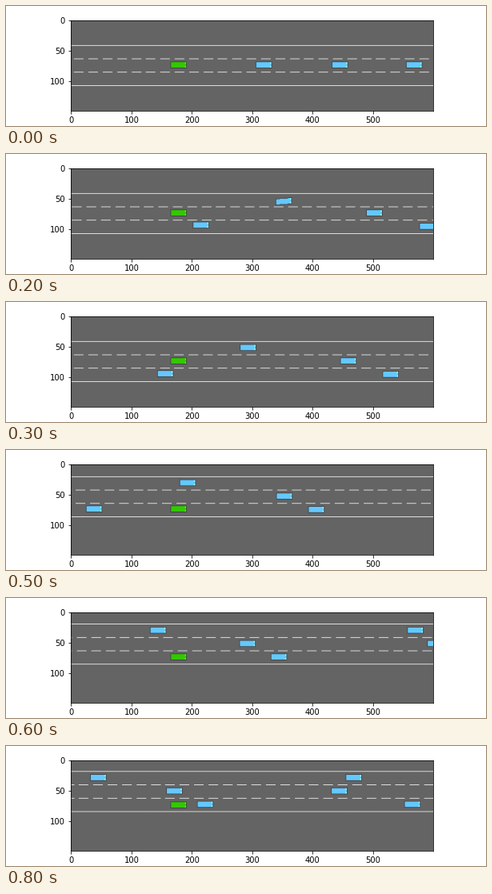
Recreate the animation shown at these times as a matplotlib script. Size 600 by 150 pixels, loop 900 ms.

```python
import math

import numpy as np
import matplotlib.pyplot as plt
from matplotlib.animation import FuncAnimation

W, H, DPI = 600, 150, 72
STEPS, STEP_MS = 9, 100
METRE = 5.5                        # road pixels per metre
LANE = 22
PERIOD, DASH = 4.33 * METRE, 16
TOP = 42                           # top road line before the lane change
RATE = 1.5                         # how fast speed and steering settle
EGO = (178.5, 74.5)
EGO_TURN = 3

ROAD, LINE, EDGE = (100, 100, 100), (255, 255, 255), (60, 60, 60)
GREEN, BLUE = (50, 200, 0), (100, 200, 255)

# lane, key steps, road x at those steps, lane change (start, direction)
CARS = [
    (1, [0, 1, 6], [319, 275, -21], (0, 1)),
    (1, [0, 1, 3, 8], [445, 412, 293, 45], (0.8, -1)),
    (1, [0, 1, 3, 5, 8], [568, 546, 459, 353, 171], None),
    (2, [1, 8], [652, 222], None),
    (0, [5, 8], [621, 468], None),
    (1, [5, 8], [683, 444], None),
    (2, [7, 8], [629, 565], None),
]

ROWS, COLS = np.mgrid[0:H, 0:W] + 0.5


def settle(t):
    return 1 - math.exp(-RATE * max(t, 0))


def heading(t):
    """Degrees of turn, t steps after a lane change began."""
    return 27 * math.exp(-RATE * t) if t > 0 else 0


def lighten(color):
    return tuple(min(int(c / 0.68), 255) for c in color)


def draw_car(img, cx, cy, color, degrees=0):
    a = math.radians(degrees)
    dx, dy = COLS - cx, ROWS - cy
    u = dx * math.cos(a) + dy * math.sin(a)
    v = np.abs(dy * math.cos(a) - dx * math.sin(a))
    body = (np.abs(u) <= 13.5) & (v <= 5.5)
    img[body] = color
    img[body & (u > 10.5) & (v > 1.5)] = lighten(color)
    img[body & ((np.abs(u) > 12.5) | (v > 4.5))] = EDGE


def draw_road(img, top, step):
    img[top] = img[top + 3 * LANE] = LINE
    # The followed car speeds up from 25 to 30 metres per step
    travelled = METRE * (30 * step - 5 / RATE * settle(step))
    start = (5.3 - travelled) % PERIOD - PERIOD
    for k in range(int(W / PERIOD) + 3):
        x = round(start + k * PERIOD)
        for row in (top + LANE, top + 2 * LANE):
            img[row, max(x, 0):max(x + DASH, 0)] = LINE


def render(step):
    img = np.full((H, W, 3), ROAD, dtype=np.uint8)
    since = max(step - EGO_TURN, 0)
    top = round(TOP - LANE * settle(since) - 0.2 * since)
    draw_road(img, top, step)
    for lane, keys, xs, change in CARS:
        side, turn = LANE * lane + 10, 0
        if change:
            begin, way = change
            side += way * LANE * settle(step - begin)
            turn = way * heading(step - begin)
            if begin == 0 and step == 0:
                turn = 0
        cx = math.floor(np.interp(step, keys, xs)) + 0.5
        draw_car(img, cx, top + math.floor(side) + 0.5, BLUE, turn)
    draw_car(img, *EGO, GREEN, heading(since))
    return img


fig, ax = plt.subplots(figsize=(W / DPI, H / DPI), dpi=DPI)
fig.subplots_adjust(left=0.125, right=0.9, bottom=0.125, top=0.88)
view = ax.imshow(render(0))


def update(step):
    view.set_data(render(step))
    return [view]


anim = FuncAnimation(fig, update, frames=STEPS, interval=STEP_MS,
                     repeat=True, repeat_delay=0)
plt.show()
```
